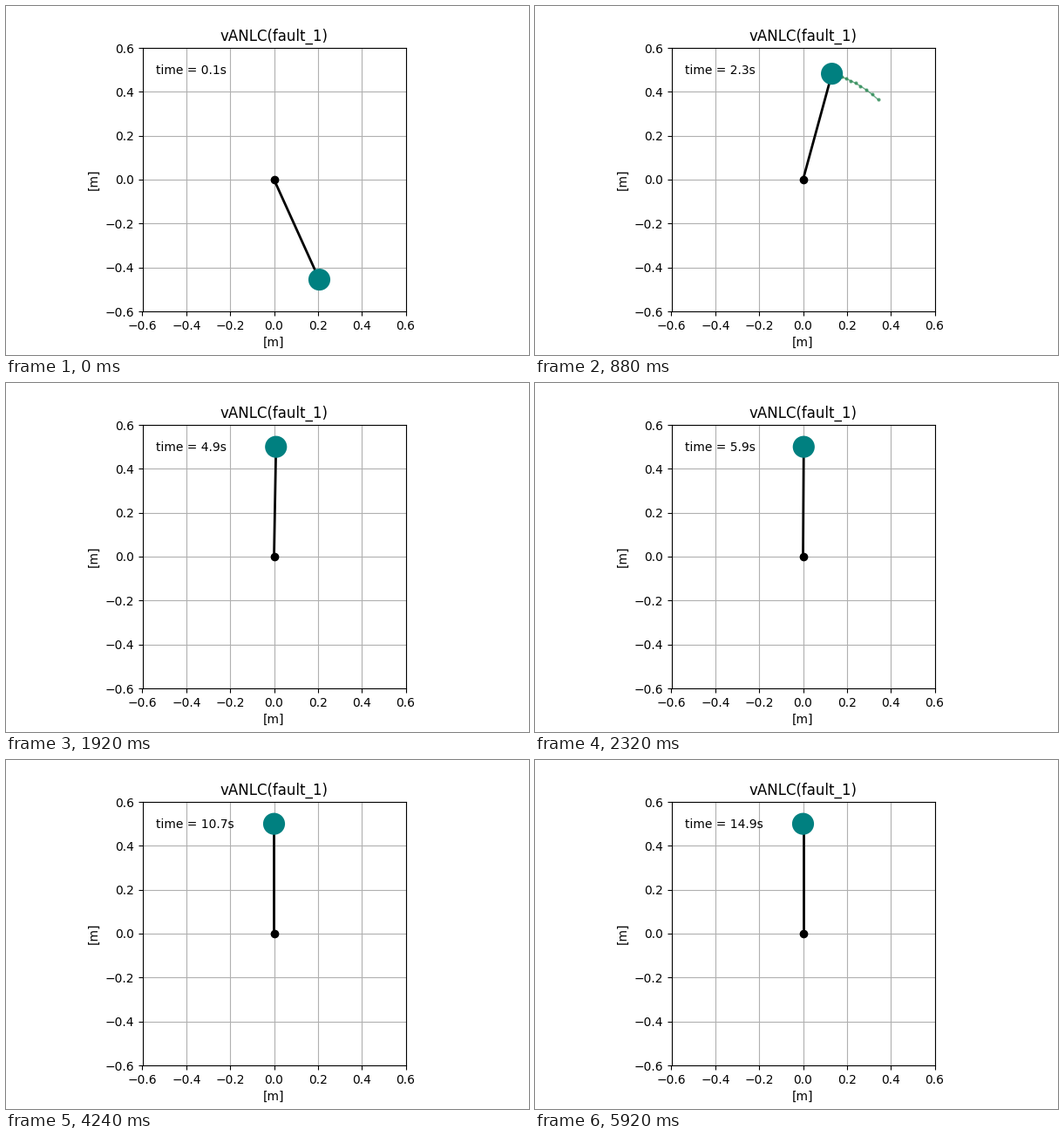
Write a matplotlib script that moves like this. It is 600 px wide and 400 px high and loops after 5960 ms.

```python
import numpy as np
import matplotlib.pyplot as plt
from matplotlib.animation import FuncAnimation

FRAMES = 149
DT = 0.1       # simulated seconds per frame
LENGTH = 0.5   # pole length in metres
TRAIL = 10     # past positions kept in the trace

# Pole angle from upright: a steady decay after a short start-up transient
t = DT * np.arange(FRAMES)
theta = np.radians(150.4 * np.exp(-1.04 * t) + 5.2 * np.exp(-6 * t))
x = LENGTH * np.sin(theta)
y = LENGTH * np.cos(theta)

plt.rcParams["font.family"] = "DejaVu Sans"
fig = plt.figure(figsize=(6, 4), dpi=100)
fig.subplots_adjust(left=0.125, right=0.9, bottom=0.125, top=0.88)
ax = fig.add_subplot(xlim=(-0.6, 0.6), ylim=(-0.6, 0.6), aspect="equal",
                     xlabel="[m]", ylabel="[m]", title="vANLC(fault_1)")
ax.grid()

pole, = ax.plot([], [], "o-", color="black", lw=2)
trace, = ax.plot([], [], "o-", color="seagreen", lw=1, ms=2, alpha=0.7)
bob = ax.add_patch(plt.Circle((x[0], y[0]), 0.05, fc="teal", lw=0, zorder=3))
clock = ax.text(0.05, 0.9, "", transform=ax.transAxes)


def update(i):
    past = slice(max(0, i - TRAIL), i + 1)
    pole.set_data([0, x[i]], [0, y[i]])
    trace.set_data(x[past], y[past])
    bob.center = x[i], y[i]
    clock.set_text(f"time = {DT * (i + 1):.1f}s")
    return pole, trace, bob, clock


anim = FuncAnimation(fig, update, frames=FRAMES, interval=40,
                     repeat=True, repeat_delay=0, blit=False)
plt.show()
```
